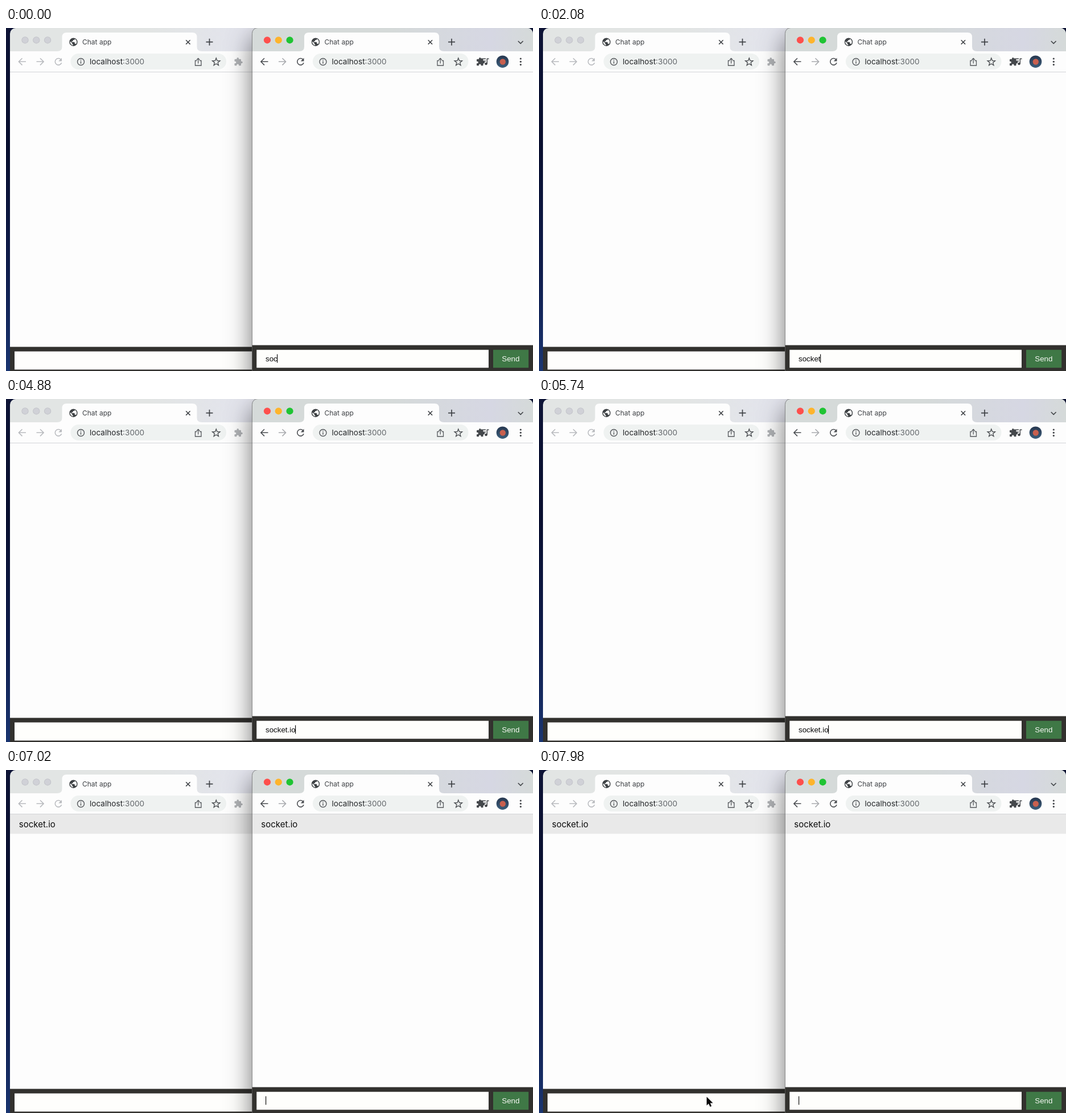
These frames come from a looping animation (926x604 px, 8 s). An HTML page with a canvas:

```html
<!DOCTYPE html>
<html lang="en">
<head>
<meta charset="utf-8">
<title>Chat app</title>
<style>
  html, body { margin: 0; width: 100%; height: 100%; overflow: hidden; }
  canvas { display: block; width: 926px; height: 604px; }
</style>
</head>
<body>
<canvas id="stage" width="926" height="604"></canvas>
<script>
const ctx = document.getElementById('stage').getContext('2d');
const LOOP = 8000, SENT = 5760, BLINK = 500;
const SHIFT = 425.5; // distance between the two windows
const MESSAGE = 'socket.io';
const KEYS = [400, 1000, 1700, 2700, 4200, 4700]; // keystrokes after "soc"
const UI = 'Inter, sans-serif';
const FORM = '13.333px "Liberation Sans", Arial, sans-serif';

const PUZZLE = new Path2D('M20.5 11H19V7c0-1.1-.9-2-2-2h-4V3.5C13 2.12 11.88 1 10.5 1S8 2.12 8 3.5V5H4c-1.1 0-2 .9-2 2v3.8h1.5c1.49 0 2.7 1.21 2.7 2.7s-1.21 2.7-2.7 2.7H2V20c0 1.1.9 2 2 2h3.8v-1.5c0-1.49 1.21-2.7 2.7-2.7s2.7 1.21 2.7 2.7V22H17c1.1 0 2-.9 2-2v-4h1.5a2.5 2.5 0 0 0 0-5z');
const GLOBE = new Path2D('M12 2a10 10 0 1 0 0 20a10 10 0 1 0 0-20zm-1 17.93c-3.95-.49-7-3.85-7-7.93 0-.62.08-1.21.21-1.79L9 15v1c0 1.1.9 2 2 2v1.93zm6.9-2.54c-.26-.81-1-1.39-1.9-1.39h-1v-3c0-.55-.45-1-1-1H8v-2h2c.55 0 1-.45 1-1V7h2c1.1 0 2-.9 2-2v-.41c2.93 1.19 5 4.06 5 7.41 0 2.08-.8 3.97-2.1 5.39z');
const POINTER = new Path2D('M0 0V15.2L3.5 12L6 17.6L8.6 16.4L6.2 11H11Z');

function rect(x, y, w, h, color) {
  ctx.fillStyle = color;
  ctx.fillRect(x, y, w, h);
}

function round(x, y, w, h, r, color) {
  ctx.fillStyle = color;
  ctx.beginPath();
  ctx.roundRect(x, y, w, h, r);
  ctx.fill();
}

function disc(x, y, r, color) {
  ctx.fillStyle = color;
  ctx.beginPath();
  ctx.arc(x, y, r, 0, 7);
  ctx.fill();
}

function stroke(d, color, width = 1.6) {
  ctx.strokeStyle = color;
  ctx.lineWidth = width;
  ctx.stroke(new Path2D(d));
}

function text(s, x, y, font, color) {
  ctx.font = font;
  ctx.fillStyle = color;
  ctx.fillText(s, x, y);
}

function icon(path, cx, cy, scale, color) {
  ctx.save();
  ctx.translate(cx, cy);
  ctx.scale(scale, scale);
  ctx.translate(-12, -12);
  ctx.fillStyle = color;
  ctx.fill(path);
  ctx.restore();
}

function star(cx, cy, color) {
  ctx.beginPath();
  for (let i = 0; i < 10; i++) {
    const a = i * Math.PI / 5 - Math.PI / 2, r = i % 2 ? 3 : 7;
    ctx.lineTo(cx + r * Math.cos(a), cy + r * Math.sin(a));
  }
  ctx.closePath();
  ctx.strokeStyle = color;
  ctx.lineWidth = 1.4;
  ctx.stroke();
}

function stripColor(active) {
  const g = ctx.createLinearGradient(0, 0, 500, 0);
  const [a, b] = active ? ['#d5dad9', '#d6d7e3'] : ['#e2e5e4', '#e3e4ed'];
  g.addColorStop(0, a);
  g.addColorStop(0.5, a);
  g.addColorStop(0.85, b);
  g.addColorStop(1, a);
  return g;
}

function tabStrip(active) {
  const lights = active ? ['#fe4f4c', '#feb42b', '#1fc433'] : Array(3).fill('#d0d1d7');
  lights.forEach((color, i) => {
    const x = 33.5 + i * 19.8;
    disc(x, 21.3, 6.1, active ? color : '#bfc0c6');
    if (!active) disc(x, 21.3, 5.3, color);
  });
  ctx.fillStyle = '#fdfdfd';
  ctx.fill(new Path2D('M90 41Q98.5 41 98.5 33V16Q98.5 8 106.5 8H327.5Q335.5 8 335.5 16V33Q335.5 41 344 41Z'));
  icon(GLOBE, 118.5, 24.7, 0.72, '#3c4043');
  text('Chat app', 134, 29, '12px ' + UI, '#3e4145');
  stroke('M316.2 21.2L323.6 28.6M323.6 21.2L316.2 28.6', '#3f4246', 1.5);
  stroke('M351.5 24.7H363.5M357.5 18.7V30.7', '#3f4246', 1.7);
}

function toolbar(active) {
  const dark = '#4a4d51', pale = '#b9bbbf';
  const main = active ? dark : pale;
  round(113.5, 45, 273.5, 28, 14, '#eff2f1');
  stroke('M35 59.3H22.5M28.5 53.2L22.4 59.3L28.5 65.4', main);
  stroke('M53.5 59.3H66M60 53.2L66.1 59.3L60 65.4', active ? '#a9abaf' : pale);
  stroke('M96.2 55.2A5.8 5.8 0 1 0 97.6 61.2', main);
  ctx.fillStyle = main;
  ctx.fill(new Path2D('M98 52.8V58.6H92.2Z'));

  stroke('M125.5 59.5a6 6 0 1 0 12 0a6 6 0 1 0 -12 0M131.5 58.6V62.8M131.5 55.8V57.3', '#55585c', 1.4);
  const font = '13.6px ' + UI;
  text('localhost', 147, 64, font, '#222427');
  text(':3000', 147 + ctx.measureText('localhost').width, 64, font, '#62666a');
  stroke('M335.3 57.5H332.5V66H343V57.5H340.2M337.7 62.5V53.5M334.9 56.2L337.7 53.4L340.5 56.2', '#55585c', 1.3);
  star(369.3, 60, '#4e5155');
  icon(PUZZLE, 408.3, 59.5, 0.68, active ? '#45484c' : '#b0b2b5');
}

function rightControls() {
  const dark = '#45484c';
  stroke('M899.8 23L904.2 27.4L908.6 23', dark, 1.7);
  stroke('M833 54.2H843M833 58.2H843M833 62.2H839M845.3 63V54.2H848.5', dark, 1.5);
  disc(843.5, 63, 2.3, dark);
  for (const y of [54, 59.3, 64.6]) disc(904.3, y, 1.6, dark);

  // profile picture
  const g = ctx.createLinearGradient(0, 48, 0, 70);
  g.addColorStop(0, '#26364f');
  g.addColorStop(1, '#3c5f7c');
  disc(872.5, 59.2, 10.8, g);
  disc(872.8, 59.5, 5.2, '#c9604f');
}

function chrome(active) {
  rect(7, 0, 520, 41, stripColor(active));
  rect(7, 41, 520, 36, '#fdfdfd');
  rect(7, 77, 520, 1, '#d2d4d7');
  rect(7, 78, 520, 530, '#fdfdfd');
  tabStrip(active);
  toolbar(active);
}

function messageRow() {
  rect(7, 78, 520, 34.3, '#e9e9e9');
  text(MESSAGE, 22.8, 101.3, '15px ' + UI, '#0a0a0a');
}

function leftWindow(sent) {
  ctx.save();
  ctx.beginPath();
  ctx.roundRect(7, 0, 520, 640, 10);
  ctx.clip();
  chrome(false);
  if (sent) messageRow();
  rect(7, 561.5, 520, 50, '#32312e');
  rect(15, 569.5, 420, 32, '#fefefc');
  ctx.restore();
}

function rightWindow(sent) {
  ctx.save();
  ctx.shadowColor = 'rgba(0,0,0,.55)';
  ctx.shadowBlur = 44;
  ctx.shadowOffsetY = 16;
  round(432.5, 0, 493.5, 640, 10, '#fdfdfd');
  ctx.restore();

  ctx.save();
  ctx.beginPath();
  ctx.roundRect(432.5, 0, 493.5, 640, 10);
  ctx.clip();
  ctx.translate(SHIFT, 0);
  chrome(true);
  if (sent) messageRow();
  ctx.translate(-SHIFT, 0);
  rightControls();
  rect(432, 558.5, 494, 50, '#32312e');
  rect(440.3, 566.7, 407.7, 31.6, '#fefefc');
  rect(856, 566.7, 62.2, 31.6, '#3f7846');
  text('Send', 871.3, 587, FORM, '#f6f8f4');
  ctx.restore();

  ctx.strokeStyle = 'rgba(60,60,60,.55)';
  ctx.lineWidth = 1;
  ctx.beginPath();
  ctx.roundRect(432.5, -0.5, 520, 640, 10);
  ctx.stroke();
}

function inputText(t) {
  const typed = KEYS.filter(k => k <= t);
  const draft = t < SENT ? MESSAGE.slice(0, 3 + typed.length) : '';
  const lastEdit = t < SENT ? typed.at(-1) ?? 0 : SENT;
  text(draft, 456, 587, FORM, '#0a0a0a');
  // each edit restarts the caret's blink
  if ((t - lastEdit) % (2 * BLINK) < BLINK || t >= 7900) {
    const x = 456 + ctx.measureText(draft).width;
    rect(Math.floor(x), 574.5, 1.2, 15, '#111');
  }
}

function pointer(t) {
  if (t < 7240) return;
  const ease = p => p * p * (3 - 2 * p);
  const clamp = p => Math.max(0, Math.min(1, p));
  const a = ease(clamp((t - 7240) / 200)), b = ease(clamp((t - 7440) / 540));
  ctx.save();
  ctx.translate(348 - 4.2 * a - 49.2 * b, 580 - 2.5 * a - 2 * b);
  ctx.lineJoin = 'round';
  ctx.strokeStyle = '#fff';
  ctx.lineWidth = 2;
  ctx.stroke(POINTER);
  ctx.fillStyle = '#080808';
  ctx.fill(POINTER);
  ctx.restore();
}

function desktop() {
  const g = ctx.createLinearGradient(0, 0, 0, 604);
  g.addColorStop(0, '#0e1436');
  g.addColorStop(0.35, '#0a1030');
  g.addColorStop(0.7, '#101d4c');
  g.addColorStop(1, '#1a3570');
  rect(0, 0, 926, 604, g);
}

function draw() {
  const t = performance.now() % LOOP;
  const sent = t >= SENT;
  desktop();
  leftWindow(sent);
  rightWindow(sent);
  inputText(t);
  pointer(t);
  requestAnimationFrame(draw);
}
draw();
</script>
</body>
</html>
```
